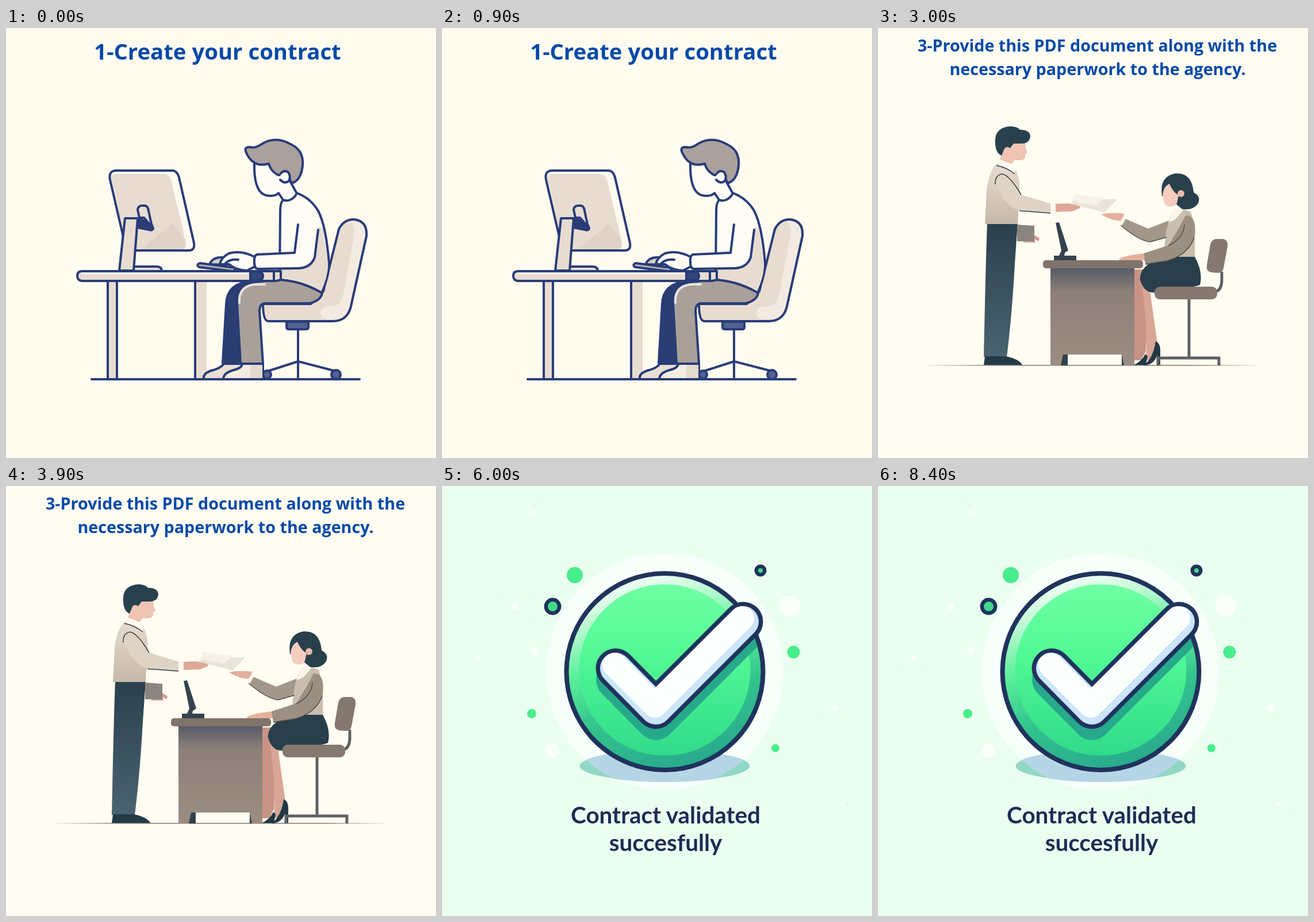
An HTML page for the animation above (10 s loop, 748x748 px).

```html
<!DOCTYPE html>
<html lang="en">
<head>
<meta charset="utf-8">
<title>Contract steps</title>
<style>
html, body { margin: 0; width: 100%; height: 100%; overflow: hidden; background: #fffbee }
svg { display: block; width: 100vw; height: 100vh }
.scene { display: none }
.title { font: 700 38.3px "Open Sans", "Noto Sans", sans-serif; fill: #0449a9; text-anchor: middle }
.small { font-size: 28.7px }
.done { font: 700 40.4px Lato, sans-serif; fill: #1d2c55; text-anchor: middle }
.ink { stroke-linecap: round; stroke-linejoin: round }
.navy { stroke: #283c78; stroke-width: 4 }
.brown { stroke: #705750; stroke-width: 4 }
.plain { stroke: none }
.line { fill: none }
</style>
</head>
<body>
<svg viewBox="0 0 748 748">
<defs>
  <linearGradient id="deskShade" x2="0" y2="1"><stop stop-color="#565b67"/><stop offset=".25" stop-color="#8d8078"/><stop offset="1" stop-color="#9b8d82"/></linearGradient>
  <linearGradient id="trousers" x2="0" y2="1"><stop stop-color="#2a404d"/><stop offset="1" stop-color="#4a6371"/></linearGradient>
  <linearGradient id="shirt" x2="0" y2="1"><stop stop-color="#e6dccd"/><stop offset="1" stop-color="#c6b8a9"/></linearGradient>
  <linearGradient id="floor"><stop stop-color="#8b8078" stop-opacity="0"/><stop offset=".2" stop-color="#8b8078"/><stop offset=".8" stop-color="#8b8078"/><stop offset="1" stop-color="#8b8078" stop-opacity="0"/></linearGradient>
  <linearGradient id="jacket" x2="0" y2="1"><stop stop-color="#7fa3a1"/><stop offset="1" stop-color="#94b3ae"/></linearGradient>
  <linearGradient id="chairBack" x2="0" y2="1"><stop stop-color="#8fafaa"/><stop offset="1" stop-color="#789f9f"/></linearGradient>
  <linearGradient id="rim" x1=".35" x2=".65" y2="1"><stop stop-color="#f8fffa"/><stop offset=".12" stop-color="#d3fbe0"/><stop offset=".4" stop-color="#5bf09b"/><stop offset=".65" stop-color="#33c48d"/><stop offset="1" stop-color="#28a78d"/></linearGradient>
  <linearGradient id="disc" x2="0" y2="1"><stop stop-color="#70ffa4"/><stop offset=".4" stop-color="#52f995"/><stop offset="1" stop-color="#30da8a"/></linearGradient>
  <clipPath id="halo"><circle cx="387" cy="323" r="206"/></clipPath>
  <clipPath id="badge"><circle cx="387.5" cy="323" r="168"/></clipPath>
  <path id="tick" d="M302 317L372 388L524 236"/>
</defs>

<g class="scene">
  <rect width="748" height="748" fill="#fffbee"/>
  <text class="title" x="368" y="55">1-Create your contract</text>
  <g class="ink navy" fill="#e8dcd1">
    <path class="plain" d="M329 440h20v171h-20z"/>
    <path class="line" d="M329 440V611"/>
    <path d="M177 440h16v171h-16z"/>
    <!-- chair -->
    <path class="line" d="M508 524V611M452 598L508 580L574 597"/>
    <g fill="#53628f"><circle cx="454" cy="603" r="7"/><circle cx="574" cy="603" r="8"/><path d="M488 511h38v9q0 4-4 4h-30q-4 0-4-4z"/></g>
    <path d="M579 350Q588 332 606 333Q629 336 627 362L601 480Q596 509 570 510H456Q447 509 447 480H530L552 458Z"/>
    <path class="plain" fill="#f3ebe1" d="M604 336Q626 336 624 362L598 480Q593 507 570 507H560Q545 505 548 490Q552 484 570 484Q583 482 587 462L606 360Q608 345 600 337z"/>
    <!-- torso -->
    <path fill="#fffcf6" d="M483 299Q477 302 477 320L476 438Q516 440 549 461Q562 430 562 410Q557 345 543 318Q530 296 506 287L498 296Z"/>
    <path class="plain" d="M545 345L539 396Q532 418 507 419L479 420V436Q520 440 548 458Q561 430 560 410Q555 370 551 350z"/>
    <!-- legs -->
    <path fill="#e8ded3" d="M344 611Q342 601 357 596Q374 592 379 584H410V611Z"/>
    <path fill="#f3ece1" d="M378 611Q378 600 396 595Q410 592 411 584H447V611Z"/>
    <path class="plain" fill="#e4d9cd" d="M425 585h21v25h-21z"/>
    <path fill="#2c3d72" d="M428 440Q384 444 383 480L377 583H410L408 470Z"/>
    <path fill="#a9a09a" d="M432 442Q399 448 402 480L408 584H447L441 492Q441 479 452 479H528Q548 474 550 461Q510 438 470 438Z"/>
    <path class="line" stroke="#e9e3db" d="M406 478Q404 450 432 446H450"/>
    <!-- arm and hand -->
    <path class="line" d="M508 342L502 391M543 351L537 399Q530 418 507 418"/>
    <path fill="#b9b3b1" d="M337 409Q330 412 336 416L393 423Q402 422 398 417Z"/>
    <path fill="#d6cdc5" d="M354 411Q360 398 376 399L382 412Z"/>
    <path fill="#fffcf6" d="M434 399Q410 386 388 392Q374 399 372 411L388 411Q400 421 419 422L435 414Z"/>
    <path class="line" d="M380 411Q388 401 404 403"/>
    <path fill="#fffcf6" d="M502 391L437 394Q431 395 432 408Q432 419 439 419L507 418"/>
    <!-- desk -->
    <path d="M132 423H478V438L470 440H132Q124 439 124 431Q124 423 132 423Z"/>
    <path class="line" stroke="#fff9ee" stroke-width="3" d="M133 427H420"/>
    <path fill="#34467a" d="M425 424H438Q447 425 447 431Q447 439 438 439H425Z"/>
    <path class="line" d="M466 426V439"/>
    <!-- monitor -->
    <path d="M222 415H262Q271 415 271 423H222Z"/>
    <path fill="#fffaf0" d="M192 248H290Q298 249 301 260L327 374Q329 387 318 387H218Q210 387 207 376L181 264Q178 248 192 248Z"/>
    <path class="plain" d="M192 254H274Q284 254 287 264L313 372Q315 385 305 385H218Q211 385 209 376L184 264Q182 254 192 254Z"/>
    <path class="plain" fill="#e1d2c8" d="M290 340L309 365Q316 385 305 385H235Z"/>
    <path fill="#2c3d72" d="M232 331L254 343L256 349Q254 353 249 351L228 347Z"/>
    <path d="M229 316Q230 309 237 309H242Q247 310 248 318L254 346L240 330H232Z"/>
    <path d="M207 331H229L222 422H197Z"/>
    <!-- head -->
    <path fill="#fffcf6" d="M432 236Q431 285 452 291Q468 294 474 287L482 299Q496 304 506 288L495 268L470 235Z"/>
    <path fill="#aaa09d" d="M418 217Q413 207 424 207Q434 210 446 201Q470 187 497 203Q521 215 515 246Q511 266 497 270L488 252L474 256Q461 250 457 236Q430 244 418 217Z"/>
    <path fill="#fffcf6" d="M478 253Q484 246 491 251Q496 259 492 266Q485 272 477 264"/>
    <path class="line" d="M149 611H615"/>
  </g>
</g>

<g class="scene">
  <rect width="748" height="748" fill="#fffaee"/>
  <rect x="88" y="651" width="550" height="12" rx="6" fill="#f8eae1"/>
  <g class="ink brown" fill="#abb7c2">
    <!-- chair base -->
    <path class="plain" d="M476 545h14v55h-14z"/>
    <path fill="#8996a7" d="M471 513h24v28q-12 6-24 0z"/>
    <path d="M477 598L376 616Q366 626 374 635L480 617ZM489 598L586 615Q597 625 589 634L489 617Z"/>
    <path d="M475 600Q483 589 491 600V630H475Z"/>
    <circle cx="378" cy="645" r="12"/><circle cx="483" cy="645" r="12"/><circle cx="581" cy="645" r="12" fill="#909cab"/>
    <!-- legs -->
    <path fill="#8792a4" d="M374 514H397L386 608Q376 614 362 611Z"/>
    <path fill="#fdf8f0" d="M258 656Q250 647 265 641Q300 632 318 613L366 615Q372 640 364 656Z"/>
    <path class="plain" fill="#f4e2d8" d="M345 618h18q5 20 0 36h-28q18-14 10-36z"/>
    <path d="M456 426L364 430Q330 434 329 480L314 609Q336 618 364 615L378 513L510 490L533 448Z"/>
    <path class="plain" fill="#929eae" d="M365 494L356 520L342 613L362 613L376 513ZM458 428Q500 444 534 450L526 476H490Q510 462 458 428Z"/>
    <!-- desk -->
    <path d="M124 400H149V647Q147 657 137 657Q126 657 124 647Z"/>
    <path d="M115 384H460V413H115Q102 412 102 398Q102 385 115 384Z"/>
    <path class="plain" fill="#8d9aaa" d="M360 388H458V411Q410 408 360 388Z"/>
    <path d="M260 375H358V382H262Q258 380 260 375Z" fill="#fffaf2"/>
    <!-- monitor -->
    <path fill="#8f9cab" d="M156 320L181 330L162 374H220Q229 376 229 382H138Q136 372 144 370Z"/>
    <path class="plain" d="M148 374H220Q227 376 226 380H142Z"/>
    <path fill="#9aa8b6" d="M158 142L140 142Q126 145 127 158L152 317Q155 330 170 329Z"/>
    <path fill="#f2f2ed" d="M156 142L245 152Q258 155 261 167L287 321Q288 334 277 334L180 329Q168 328 166 318L146 158Q144 142 156 142Z"/>
    <path class="plain" d="M164 300L282 306L285 321Q286 332 277 332L180 327Q169 326 168 318Z"/>
    <ellipse class="plain" cx="233" cy="320" rx="3" ry="4" fill="#705750"/>
    <!-- paper and hands -->
    <path fill="#fffcf6" d="M314 224L358 228L391 331L350 329Z"/>
    <path fill="#fcefe5" d="M374 275Q387 271 398 287L411 312L393 327L384 311Q371 302 357 292Q352 284 359 280Q368 280 380 289Z"/>
    <path fill="#fcf4ec" d="M408 312Q397 319 391 339Q408 352 430 358L452 328Q425 318 408 312Z"/>
    <path fill="#fcefe5" d="M358 354Q325 341 306 350L287 364Q281 374 292 374L317 363L336 376L357 379Z"/>
    <!-- body -->
    <path fill="#fffbf5" d="M424 130V195Q428 217 450 219Q461 219 470 217L475 253Q453 287 446 325L438 356L362 353Q352 372 361 390L455 399Q460 411 456 426Q480 448 533 448L556 320Q545 270 514 236L508 203L480 130Z"/>
    <path class="plain" fill="#f9ebe2" d="M506 333L484 383Q470 400 457 400Q465 415 459 426Q490 446 530 446L551 335Q520 375 506 333Z"/>
    <path class="line" d="M362 390L436 399Q468 398 480 375Q488 352 507 329"/>
    <path class="plain" fill="#f6e1d7" d="M471 217Q486 211 490 202L480 240Z"/>
    <!-- hair -->
    <path fill="#a2b0be" d="M421 152Q408 135 417 115Q424 101 436 100Q470 76 514 99Q547 112 546 150Q543 190 509 204Q494 201 489 178L465 160Q440 156 428 137Z"/>
    <path class="plain" fill="#8391a4" d="M496 162Q525 172 543 160Q538 190 509 202Q496 200 491 182Z"/>
    <path class="line" d="M428 137Q424 119 433 108M448 140Q452 157 474 157"/>
    <path class="plain" fill="#fffbf5" d="M463 162L474 158L482 184H470Z"/>
    <path fill="#fffbf5" d="M474 172Q478 160 489 163Q498 168 495 179Q488 188 477 182"/>
    <!-- chair seat -->
    <path class="plain" d="M388 479H505Q530 480 533 462L565 275Q570 246 600 246Q631 246 629 280L601 470Q594 512 556 513H388Q370 512 370 496Q370 480 388 479Z"/>
    <path class="plain" fill="#9aa8b6" d="M563 290Q570 248 595 247Q580 260 578 290L551 455Q545 480 515 481L533 462Z"/>
    <path class="line" stroke="#c0cad2" stroke-width="3" d="M622 280L594 450Q588 479 560 486"/>
    <path class="line" d="M557 318L533 462Q530 479 505 479H388Q370 480 370 496Q370 513 388 513H552Q580 512 592 490"/>
  </g>
  <text class="title" x="362" y="38">2-Print the PDF or save it on your</text>
  <text class="title" x="357" y="92">phone</text>
</g>

<g class="scene">
  <rect width="748" height="748" fill="#fffdf1"/>
  <text class="title small" x="381.5" y="41">3-Provide this PDF document along with the</text>
  <text class="title small" x="382" y="82">necessary paperwork to the agency.</text>
  <rect x="78" y="586" width="590" height="1.6" fill="url(#floor)"/>
  <!-- standing man -->
  <g fill="#efc4b2">
    <path d="M222 188H255L257 210L260 217L256 220Q258 230 246 230H237L230 242L211 234Z"/>
    <path d="M266 356L281 366L279 371L272 367L274 373H252Z" fill="#d9978a"/>
    <path d="M308 306L330 305L350 308L352 313L338 319L308 320Z" fill="#dea798"/>
  </g>
  <path fill="#29414e" d="M204 202Q201 172 232 171Q243 172 247 177Q264 177 265 188Q264 201 250 201H236L229 210L219 212L215 222Q205 218 204 202Z"/>
  <circle cx="225" cy="213" r="6" fill="#efc4b2"/>
  <path fill="url(#trousers)" d="M190 338H243L238 410Q233 500 224 573L184 572Q187 420 190 338Z"/>
  <path fill="#243a48" d="M186 571H222Q246 576 251 586H184Z"/>
  <path fill="#8b8580" d="M242 342L272 344V371H242Z"/>
  <path fill="url(#shirt)" d="M209 234Q194 244 189 280L186 341H243L245 302Q250 262 238 244Z"/>
  <path fill="#ded3c4" d="M204 264Q212 249 225 258L249 290L302 306V322L245 318Q214 305 204 264Z"/>
  <path fill="#fff9ee" d="M300 306L309 307V321L300 322ZM212 229L239 239L238 252L208 238Z"/>
  <g class="line" stroke="#303e46" stroke-width="1.5"><path d="M206 239Q225 243 238 254M204 272Q203 256 216 254Q229 256 249 290M246 318L300 322M191 362Q188 385 195 389"/></g>
  <path fill="#e9e4da" d="M343 289L389 298L416 298L394 321L337 306Z"/>
  <path fill="#f5f1e7" d="M343 289L395 296L379 309L340 302Z"/>
  <!-- seated woman -->
  <path fill="#c99384" d="M446 420H462L470 470L466 562L458 578H446Z"/>
  <path fill="#d9a695" d="M455 420L472 450L486 548L476 577L466 578Q470 510 455 420Z"/>
  <path fill="#223845" d="M445 586Q459 580 465 567L469 571L466 586ZM462 587Q479 574 483 545Q492 548 491 566V586H488L485 570Q480 586 462 587Z"/>
  <path fill="#e5b09d" d="M388 324Q405 320 428 323L426 336Q404 335 388 324ZM419 402Q430 395 465 392V404L421 405Z"/>
  <path fill="#a39789" d="M508 334L470 349L428 331L423 343Q455 371 474 372L504 363Z"/>
  <path fill="#fff8eb" d="M427 327L431 332L424 344L420 339Z"/>
  <path fill="#c9bdae" d="M512 322Q530 312 544 320Q553 345 551 402H498Q498 345 512 322Z"/>
  <path fill="#293f4c" d="M500 398H551Q566 425 560 447Q545 453 505 451L484 460Q463 463 456 438Q454 423 470 411Z"/>
  <path fill="#9b8f81" d="M535 326Q555 325 551 362Q543 393 503 405L465 411L462 392L505 378Q523 350 535 326Z"/>
  <path class="line" stroke="#4e4b49" stroke-width="1.4" d="M422 343Q455 371 474 372L502 364M465 411L503 405Q540 394 550 365M533 342Q532 365 505 379"/>
  <path fill="#293f4c" d="M494 292Q489 258 517 253Q546 251 549 286Q562 292 557 305Q548 318 529 315L517 305Z"/>
  <path fill="#f3cdbd" d="M495 290Q497 275 507 271Q513 286 523 291L519 308Q504 314 498 305Z"/>
  <circle cx="527" cy="288" r="6" fill="#e8b9a6"/>
  <path fill="#fff5e8" d="M515 315L532 316L517 333L505 338Z"/>
  <g class="line" stroke="#5f6066" stroke-width="5"><path d="M598 424V440Q597 457 586 459M541 472V574M487 587V574H593V587"/></g>
  <rect x="481" y="450" width="109" height="22" rx="9" fill="#85786f"/>
  <path fill="#85786f" d="M588 367H600Q609 368 608 380L601 418Q599 427 590 426L579 425Q570 423 572 412L578 377Q580 368 588 367Z"/>
  <!-- desk -->
  <path fill="#32414c" d="M318 568H330V587H318ZM424 568H431V587H424Z"/>
  <path fill="url(#deskShade)" d="M300 417H446V587H428L424 568H322L318 587H300Z"/>
  <rect x="287" y="404" width="174" height="14" rx="5" fill="#80736b"/>
  <path fill="#34434d" d="M309 339L315 338L331 387L325 391L324 396H345V404H306V396H315L319 387Z"/>
</g>

<g class="scene">
  <rect width="748" height="748" fill="#fff7e4"/>
  <text class="title small" x="381.5" y="41">4-An agent will verify and activate your contract.</text>
  <path fill="#8db0aa" d="M55 673L225 632L355 670L238 702ZM250 630L330 607L708 648L500 686L430 678L345 667Z"/>
  <!-- desk -->
  <g fill="#76a09f">
    <path d="M127 520H157V632H127ZM428 470H437V601H428Z"/>
    <path d="M655 455H680V643L667 646L655 642Z"/>
    <path fill="#81a5a3" d="M255 402L437 426V487L340 476Z"/>
    <path d="M462 424L680 404V463L462 487Z" fill="#7a9f9f"/>
    <path d="M436 424H463V678L449 681L436 676Z"/>
    <path fill="#5d8b8e" d="M449 426H463V678L449 681Z"/>
  </g>
  <path fill="#b6cabf" d="M235 391L390 377L707 388L462 406Z"/>
  <path fill="#96b5ae" d="M238 391L462 405L707 388V405L462 426L250 406Z"/>
  <path class="line" stroke="#406f78" stroke-width="3" d="M252 407L462 427L680 408"/>
  <path fill="#608b8d" d="M318 384L380 382L455 383L497 380L450 385L400 382L350 386Z"/>
  <!-- monitor and telephone -->
  <path fill="#779f9f" d="M513 336H556L565 376H518Z"/>
  <path fill="#81a5a3" d="M497 374H574V383H499Z"/>
  <path fill="#bccbc1" d="M460 188H600Q614 190 613 205L601 324Q598 338 583 338L447 334Q434 332 435 318L448 200Q450 189 460 188Z"/>
  <path fill="#3e6674" d="M461 190H594Q604 191 603 202L588 322Q586 334 574 334L447 331Q437 330 438 318L451 201Q452 191 461 190Z"/>
  <path fill="#80a5a2" d="M582 369L600 354L685 356L688 362V382L665 388L583 386Z"/>
  <path fill="#c3d0c5" d="M583 371L600 354L684 357L665 372Z"/>
  <path class="line" stroke="#5c8789" stroke-width="2" d="M606 361L650 363M600 366L645 368M583 372L665 374L687 363"/>
  <path fill="#749c9b" d="M640 338H677V355H640ZM657 338L661 314Q658 298 678 292Q680 306 668 318L664 338Z"/>
  <!-- legs -->
  <path fill="#c4938a" d="M273 515H302L285 633H270Z"/>
  <path fill="#dab3a5" d="M298 510L352 470Q354 540 322 600Q317 625 326 658L286 640Q300 570 298 510Z"/>
  <path fill="#547f85" d="M263 627Q270 623 285 630L294 655L288 668L283 650L272 667H268L269 650Z"/>
  <path fill="#7b9b9b" d="M279 627Q295 623 304 645L324 658L349 662Q350 670 318 670L292 653L290 668H286Z"/>
  <path fill="#1f4e5b" d="M258 430L335 428Q356 433 355 460Q350 492 315 505L205 512L190 486Z"/>
  <!-- torso and far arm -->
  <path fill="#7fa5a2" d="M258 297L300 268L320 284L280 318Z"/>
  <path fill="#fff6e6" d="M299 268L307 264L323 283L315 290Z"/>
  <path fill="#d3a69a" d="M306 270Q308 242 324 222L343 207L347 214L334 270L322 284Z"/>
  <path fill="url(#jacket)" d="M170 237Q140 253 141 290L175 388L193 488Q240 486 271 460Q265 425 240 397L250 360L247 265L215 237Z"/>
  <path fill="#1f4e5b" d="M174 383L241 381L239 397L178 399Z"/>
  <path class="line" stroke="#547f85" stroke-width="1.6" d="M180 254Q172 300 188 383M224 344L236 380M219 268Q214 300 230 342"/>
  <!-- handheld -->
  <path fill="#234b5d" d="M361 148L400 152Q409 154 407 164L384 267Q381 277 371 277L337 276Q327 274 329 265L350 156Q353 148 361 148Z"/>
  <path fill="#fff9ea" d="M362 151H394Q402 153 400 163L378 264Q375 272 368 272L339 272Q332 271 333 263L354 158Q356 151 362 151Z"/>
  <path fill="#234b5d" d="M368 150H393L391 155Q381 158 370 155Z"/>
  <path fill="#b5c1b3" d="M361 176L383 178L380 193L359 191Z"/>
  <path class="line" stroke="#a9b4a8" stroke-width="1.6" d="M363 172H384M356 205L378 207M355 210L377 212M351 228L370 229M350 234L370 235M349 240L368 241M348 246L366 247M347 252L360 253"/>
  <path fill="#d9b0a3" d="M355 275Q360 258 380 250L397 215Q406 232 402 247Q392 272 370 297Z"/>
  <path fill="#fff6e6" d="M350 278L358 272L375 292L368 300Z"/>
  <path fill="#8fafaa" d="M218 268Q240 258 252 288L282 335L343 283Q360 285 370 300L300 376Q285 392 260 382Q222 350 216 310Z"/>
  <path class="line" stroke="#1f4e5b" stroke-width="3" d="M217 308Q225 335 258 361M281 335L316 308M288 334Q302 343 298 358M290 346Q296 354 290 364"/>
  <!-- head -->
  <path fill="#d9b0a3" d="M224 180L258 168Q263 212 248 224Q236 230 222 228L216 238L183 232L184 218Z"/>
  <path fill="#fff6e6" d="M184 226Q200 230 215 237L213 244L182 236Z"/>
  <path fill="#7ba19f" d="M162 253L172 234L214 240L217 254L196 256Z"/>
  <path class="line" stroke="#1f4e5b" stroke-width="3" d="M163 251Q190 258 216 252"/>
  <path fill="#215260" d="M165 176Q160 130 207 123Q255 123 263 172L257 180Q245 191 226 194L218 211Q198 225 174 219Z"/>
  <circle cx="167" cy="193" r="17" fill="#215260"/>
  <ellipse cx="219" cy="194" rx="6" ry="9" fill="#d9b0a3"/>
  <path class="line" stroke="#1f4e5b" stroke-width="2" d="M215 202Q220 208 225 201"/>
  <!-- chair -->
  <g class="line ink" stroke="#5d8b8e" stroke-width="8"><path d="M184 640L95 671M184 640L171 684M188 642L274 674"/></g>
  <g fill="#1f4e5b"><circle cx="95" cy="674" r="7"/><circle cx="171" cy="688" r="7"/><circle cx="275" cy="678" r="7"/>
  <path d="M160 534H213Q212 549 191 549V590H177V549Q160 548 160 534Z"/></g>
  <path fill="#6d9697" d="M172 584H197V604L201 609V646Q185 658 167 646V609L172 604Z"/>
  <path fill="#dde2d3" d="M62 320L135 325Q154 327 160 345L190 490Q194 505 210 504L300 498Q316 500 315 515Q313 527 295 530L95 529Q75 528 70 505L39 348Q36 324 62 320Z"/>
  <path fill="url(#chairBack)" d="M62 327L126 331Q144 334 149 352L177 490Q183 516 210 516L314 513Q311 524 295 530L95 529Q78 528 73 505L43 348Q42 330 62 327Z"/>
  <path class="line" stroke="#436f78" stroke-width="2" d="M90 530H295Q310 528 315 516"/>
</g>

<g class="scene">
  <rect width="748" height="748" fill="#eaffef"/>
  <circle cx="387" cy="323" r="206" fill="#f7fffb"/>
  <ellipse cx="387.5" cy="487" rx="148" ry="27" fill="#91d8c4"/>
  <ellipse cx="387.5" cy="487" rx="148" ry="28" fill="#b5d5e6" clip-path="url(#halo)"/>
  <circle cx="387.5" cy="323" r="171" fill="url(#rim)"/>
  <circle cx="387.5" cy="320" r="149" fill="url(#disc)"/>
  <g class="line ink">
    <g clip-path="url(#badge)"><use href="#tick" y="20" stroke="#27a98b" stroke-width="68"/></g>
    <circle cx="387.5" cy="323" r="171" stroke="#1f335c" stroke-width="8"/>
    <use href="#tick" stroke="#1f335c" stroke-width="69"/>
    <use href="#tick" stroke="#cbe5fb" stroke-width="54"/>
    <use href="#tick" x="-2" y="-6" stroke="#fbfffe" stroke-width="42"/>
  </g>
  <g fill="#48ee8c">
    <circle cx="231" cy="155" r="14"/><circle cx="611.5" cy="289" r="11"/><circle cx="580" cy="456" r="7"/><circle cx="156" cy="396" r="8"/>
    <g stroke="#1f335c" stroke-width="6.5" fill="#43d98d"><circle cx="192.5" cy="209.5" r="11.7"/><circle cx="554" cy="147" r="7.3"/></g>
  </g>
  <g fill="#fbfffc">
    <circle cx="605" cy="208" r="18"/><circle cx="192" cy="460" r="12"/><circle cx="162" cy="287" r="7"/><circle cx="127" cy="211" r="6"/>
    <circle cx="683" cy="387" r="6"/><circle cx="62" cy="300" r="4"/><circle cx="697" cy="552" r="3.5"/><circle cx="160" cy="45" r="3.5"/>
  </g>
  <text class="done" x="389" y="587">Contract validated</text>
  <text class="done" x="389" y="635">succesfully</text>
</g>
</svg>
<script>
const LOOP = 10000;
const starts = [0, 1500, 3000, 4500, 6000];
const scenes = document.querySelectorAll('.scene');

function render(now) {
  const time = now % LOOP;
  const active = starts.filter(start => start <= time).length - 1;
  scenes.forEach((scene, i) => { scene.style.display = i === active ? 'inline' : 'none'; });
}

function tick(now) {
  render(now);
  requestAnimationFrame(tick);
}

render(0);
requestAnimationFrame(tick);
</script>
</body>
</html>
```
